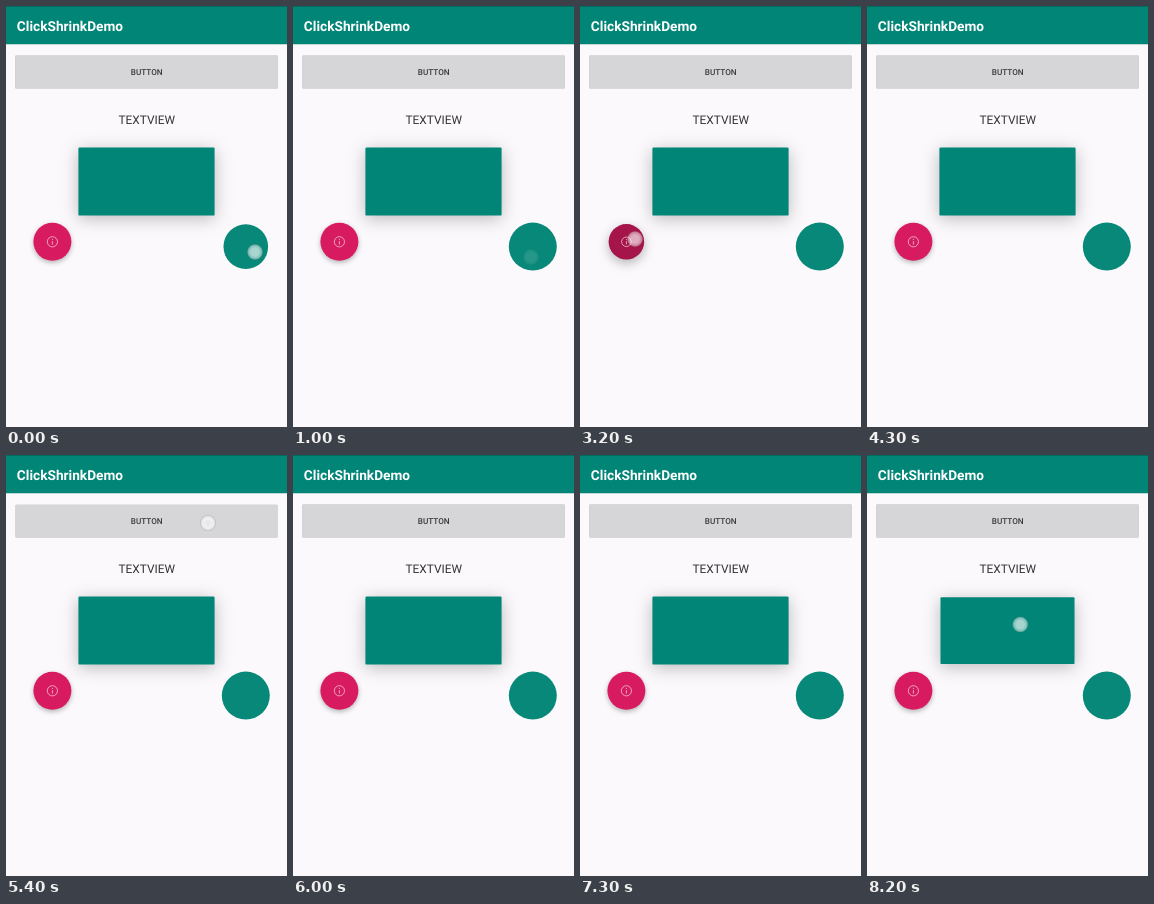
Write an HTML page that moves like this. It is 281x421 px and loops after 8.3 s.

```html
<!DOCTYPE html>
<html lang="en">
<head>
<meta charset="utf-8">
<title>ClickShrinkDemo</title>
<style>
  html, body { margin: 0; width: 100%; height: 100%; overflow: hidden; background: #fbf9fc; }
  svg { display: block; width: 100vw; height: 100vh; font-family: Roboto, sans-serif; }
  text { text-rendering: geometricPrecision; }
  .press { --lift: 0; }
  .bar { filter: drop-shadow(0 .6px .7px rgba(0, 0, 0, .25)); }
  .flat { filter: drop-shadow(0 .6px calc(.7px + 1.3px * var(--lift)) rgba(0, 0, 0, .25)); }
  .raised { filter: drop-shadow(0 calc(2px + 2px * var(--lift)) calc(2.5px + 3px * var(--lift)) rgba(0, 0, 0, .28)); }
  .high { filter: drop-shadow(0 3px 8.5px rgba(0, 0, 0, .26)); }
</style>
</head>
<body>
<svg viewBox="0 0 281 421">
  <defs>
    <clipPath id="buttonClip"><rect x="9.2" y="49.6" width="262.6" height="33" rx="1"/></clipPath>
    <clipPath id="fabClip"><circle cx="46.4" cy="235.8" r="19"/></clipPath>
    <radialGradient id="touchFill">
      <stop offset=".55" stop-color="#fff" stop-opacity=".65"/>
      <stop offset="1" stop-color="#fff" stop-opacity=".4"/>
    </radialGradient>
  </defs>
  <rect width="281" height="421" fill="#fbf9fc"/>

  <rect class="bar" width="281" height="38.2" fill="#008577"/>
  <rect width="281" height=".8" fill="#00665b"/>
  <text x="10.8" y="25" font-size="13.7" font-weight="700" fill="#fff">ClickShrinkDemo</text>

  <g id="button" class="press">
    <rect class="flat" x="9.2" y="49.6" width="262.6" height="33" rx="1" fill="#d6d5d7"/>
    <circle class="ripple" clip-path="url(#buttonClip)" fill="#000"/>
    <text x="140.7" y="69.2" font-size="8.2" font-weight="500" text-anchor="middle" fill="#3a3a3b">BUTTON</text>
  </g>

  <text x="140.7" y="118.4" font-size="11.9" text-anchor="middle" fill="#333334">TEXTVIEW</text>

  <g id="card" class="press">
    <rect class="high" x="72.4" y="141.6" width="136.2" height="68" rx="1.2" fill="#008577"/>
  </g>

  <g id="fab" class="press">
    <circle class="raised" cx="46.4" cy="235.8" r="19" fill="#d81b60"/>
    <circle class="ripple" clip-path="url(#fabClip)" fill="#000"/>
    <g fill="none" stroke="#ecb3c7" stroke-width=".9">
      <circle cx="46.4" cy="235.8" r="5.1"/>
      <path d="M46.4 235.1v3.5M46.4 232.9v1.1"/>
    </g>
  </g>

  <g id="icon" class="press">
    <circle cx="239.8" cy="240.6" r="24" fill="#078878"/>
  </g>

  <g id="touches"></g>
</svg>
<script>
  const LOOP = 8300, STEP = 100, SHRINK = 200, GROW = 100, FADE = 300;

  const views = {
    button: { cx: 140.5, cy: 66.1, depth: .07, reach: 136.5, shade: .117 },
    card: { cx: 140.5, cy: 175.6, depth: .07 },
    fab: { cx: 46.4, cy: 235.8, depth: .065, reach: 40, shade: .24 },
    icon: { cx: 239.8, cy: 240.6, depth: .07 }
  };

  // Times are in ms; a negative start is a press already held as the loop begins.
  const taps = [
    { view: 'icon', down: -300, up: 300, x: 249, y: 246 },
    { view: 'icon', down: 500, up: 770, x: 238, y: 251 },
    { view: 'card', down: 1800, up: 2090, x: 179, y: 187 },
    { view: 'card', down: 2150, up: 2200, x: 185, y: 184 },
    { view: 'fab', down: 2900, up: 3700, x: 55, y: 233 },
    { view: 'button', down: 4800, up: 5080, x: 204, y: 67 },
    { view: 'button', down: 5395, up: 5405, x: 202, y: 68 },
    { view: 'button', down: 6280, up: 6800, x: 208.5, y: 66.3 },
    { view: 'card', down: 8155, up: 8400, x: 153.3, y: 169.5 }
  ];

  const clamp = v => Math.min(1, Math.max(0, v));

  for (const [id, view] of Object.entries(views)) {
    view.el = document.getElementById(id);
    view.ripple = view.el.querySelector('.ripple');
  }

  const touches = document.getElementById('touches');
  for (const tap of taps) {
    const dot = document.createElementNS('http://www.w3.org/2000/svg', 'circle');
    const look = { cx: tap.x, cy: tap.y, r: 7.5, fill: 'url(#touchFill)',
                   stroke: '#888', 'stroke-opacity': .4, 'stroke-width': .8 };
    for (const [name, value] of Object.entries(look)) dot.setAttribute(name, value);
    tap.dot = touches.appendChild(dot);
  }

  function touchAlpha(tap, t) {
    if (t < tap.down) return 0;
    return t <= tap.up ? 1 : .8 * clamp(1 - (t - tap.up) / FADE);
  }

  function pressAmount(tap, t) {
    const pressed = clamp((Math.min(t, tap.up) - tap.down) / SHRINK);
    return pressed * clamp(1 - (t - tap.up) / GROW);
  }

  function drawView(id, view, t) {
    const tap = taps.findLast(p => p.view === id && p.down <= t);
    const press = tap ? pressAmount(tap, t) : 0;
    const scale = 1 - view.depth * press;
    const { cx, cy, ripple } = view;
    view.el.style.setProperty('--lift', press);
    view.el.setAttribute('transform',
      `translate(${cx} ${cy}) scale(${scale}) translate(${-cx} ${-cy})`);
    if (!ripple) return;
    ripple.setAttribute('r', tap ? view.reach * Math.min(1.6, (t - tap.down) / 220) : 0);
    if (!tap) return;
    ripple.setAttribute('cx', cx + (tap.x - cx) / scale);
    ripple.setAttribute('cy', cy + (tap.y - cy) / scale);
    ripple.setAttribute('fill-opacity', view.shade * clamp(1 - (t - tap.up) / FADE));
  }

  const start = performance.now();
  function draw() {
    const elapsed = (performance.now() - start) % LOOP;
    const t = Math.floor(elapsed / STEP) * STEP;
    for (const [id, view] of Object.entries(views)) drawView(id, view, t);
    for (const tap of taps) tap.dot.setAttribute('opacity', touchAlpha(tap, t));
    requestAnimationFrame(draw);
  }
  draw();
</script>
</body>
</html>
```
